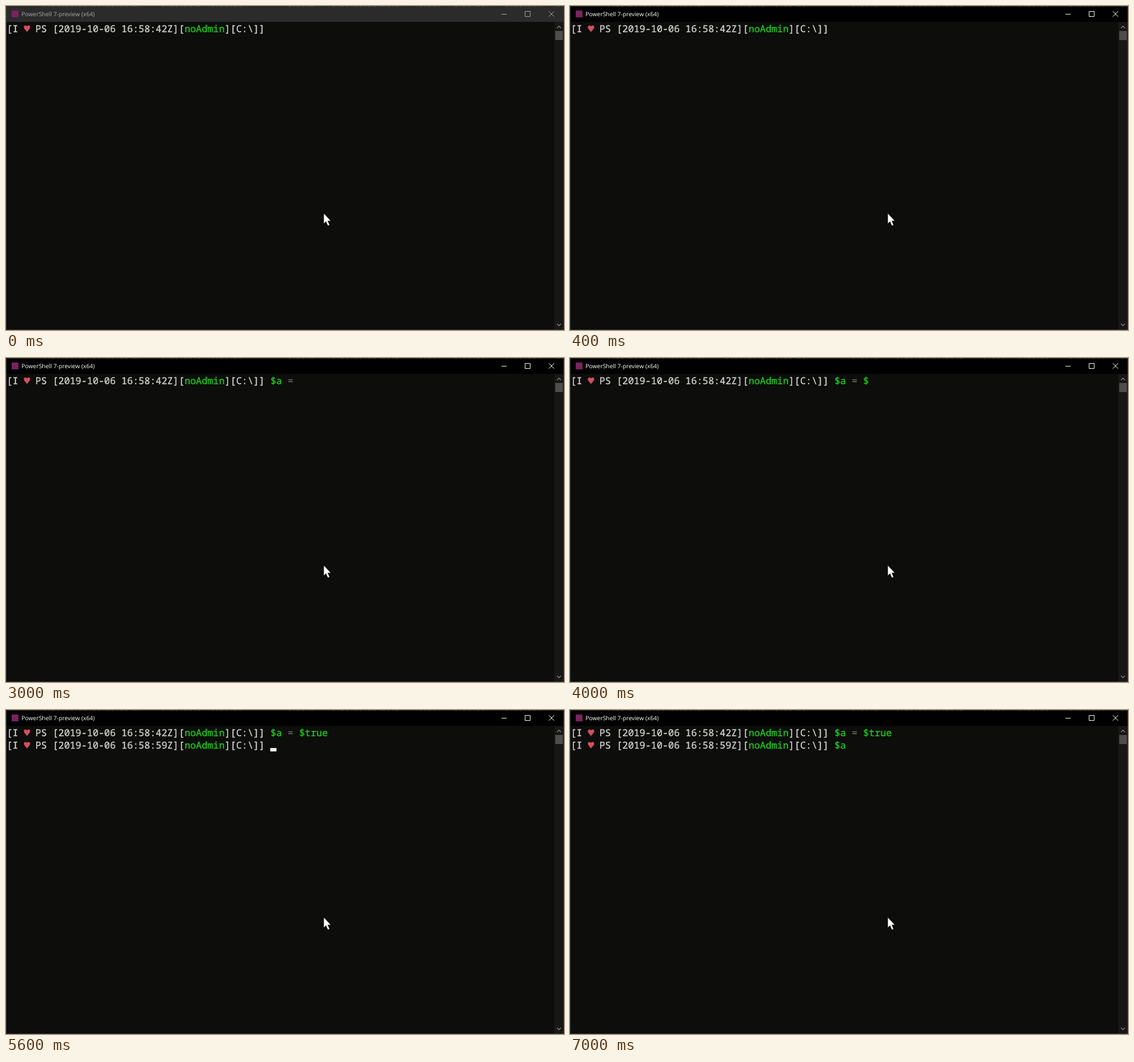
These frames come from a looping animation (982x571 px, 8000 ms). An HTML page:

```html
<!DOCTYPE html>
<html lang="en">
<head>
<meta charset="utf-8">
<title>Terminal</title>
<style>
  html, body { margin: 0; width: 100%; height: 100%; overflow: hidden; background: #0d0d0c; }
  svg { display: block; width: 982px; height: 571px; }
  text { white-space: pre; text-rendering: geometricPrecision; }
  .mono { font: 16.82px "Noto Sans Mono", "DejaVu Sans Mono", monospace; fill: #d2d2d2; stroke: #d2d2d2; stroke-width: .35; }
  .mono.green { fill: #1ecb18; stroke: #1ecb18; }
  .mono.dim { fill: #808080; stroke: none; }
  .title { font: 10.35px "Open Sans", "Noto Sans", sans-serif; }
  .line { fill: none; stroke-width: 1; }
  /* the window gains focus once per loop */
  .bar { animation: bar 8s step-end infinite; }
  .label { animation: label 8s step-end infinite; }
  .button { animation: button 8s step-end infinite; }
  @keyframes bar { 0% { fill: #2b2b2b; } 5%, 100% { fill: #000; } }
  @keyframes label { 0% { fill: #a8a8a8; } 5%, 100% { fill: #fff; } }
  @keyframes button { 0% { stroke: #a4a4a4; } 5%, 100% { stroke: #fff; } }
</style>
</head>
<body>
<svg viewBox="0 0 982 571">
  <rect width="982" height="571" fill="#0d0d0c"/>
  <rect class="bar" width="982" height="28"/>

  <!-- window edge with a sliver of what lies behind it -->
  <path class="line" stroke="#333" d="M0 .5H982M.5 0V571M981.5 0V571M0 570.5H982"/>
  <path class="line" stroke="#585858" stroke-dasharray="4 5 2 3 6 4"
        d="M66 .5H236M275 .5H342M362 .5H418M497 .5H542M575 .5H694M728 .5H765M790 .5H848M880 .5H940M970 .5H982"/>

  <rect x="10" y="8" width="12" height="12" fill="#7a2260"/>
  <text class="title label" x="27.3" y="18">PowerShell 7-preview (x64)</text>
  <g class="line button">
    <path d="M872 14.5H881M913.5 9.5H922.5V18.5H913.5Z"/>
    <path d="M955.3 9.3L964.7 18.7M964.7 9.3L955.3 18.7"/>
  </g>

  <rect x="965" y="28" width="16" height="542" fill="#171717"/>
  <rect x="966.5" y="44" width="13.5" height="16" fill="#4d4d4d"/>
  <path class="line" stroke="#8a8a8a" style="stroke-width:1.3" d="M969.8 39L973.2 35.4L976.6 39M969.8 560L973.2 563.6L976.6 560"/>

  <g id="screen"></g>

  <path fill="#fff" d="M559.5 366V383L563.3 379.6L566.5 387L569.2 385.9L566 378.6H571.2Z"/>
</svg>
<script>
const LOOP = 8000, CELL = 10.092, LEFT = 1.3, ROW = 22;
const screen = document.getElementById("screen");
const parts = [];

function add(tag, attrs, from = 0, to = LOOP) {
  const el = document.createElementNS("http://www.w3.org/2000/svg", tag);
  for (const key in attrs) el.setAttribute(key, attrs[key]);
  screen.append(el);
  parts.push({ el, from, to });
  return el;
}

function write(row, col, str, from, color = "") {
  const pos = { class: "mono " + color, x: LEFT + col * CELL, y: 46 + row * ROW };
  add("text", pos, from).textContent = str;
}

function cursor(row, col, from, to) {
  const x = Math.floor(LEFT + col * CELL);
  add("rect", { x, y: 45 + row * ROW, width: 11, height: 6, fill: "#f2f2f2" }, from, to);
}

function prompt(row, time, from) {
  write(row, 0, "[I", from);
  add("path", {
    fill: "#d84e5a",
    transform: `translate(37 ${34 + row * ROW})`,
    d: "M0 2.2C-1-.3-5.5-.8-5.5 3.4C-5.5 6.4-2 8.4 0 12C2 8.4 5.5 6.4 5.5 3.4C5.5-.8 1-.3 0 2.2Z"
  }, from);
  write(row, 5, `PS [2019-10-06 ${time}][`, from);
  write(row, 31, "noAdmin", from, "green");
  write(row, 38, "][C:\\]]", from);
}

prompt(0, "16:58:42Z", 0);
cursor(0, 46, 800, 1200);
cursor(0, 46, 1400, 1600);
write(0, 46, "$", 1600, "green");
write(0, 47, "a", 1800, "green");
write(0, 49, "=", 2600, "dim");
cursor(0, 50, 2600, 2800);
write(0, 51, "$", 3800, "green");
cursor(0, 52, 3800, 4000);
write(0, 52, "t", 4200, "green");
write(0, 53, "r", 4400, "green");
write(0, 54, "u", 4600, "green");
write(0, 55, "e", 5000, "green");
cursor(0, 56, 5000, 5200);

prompt(1, "16:58:59Z", 5600);
cursor(1, 46, 5600, 5800);
write(1, 46, "$a", 6200, "green");
cursor(1, 48, 6600, 7000);

const start = performance.now();
function draw() {
  const t = (performance.now() - start) % LOOP;
  for (const { el, from, to } of parts)
    el.style.visibility = t >= from && t < to ? "visible" : "hidden";
  requestAnimationFrame(draw);
}
draw();
</script>
</body>
</html>
```
